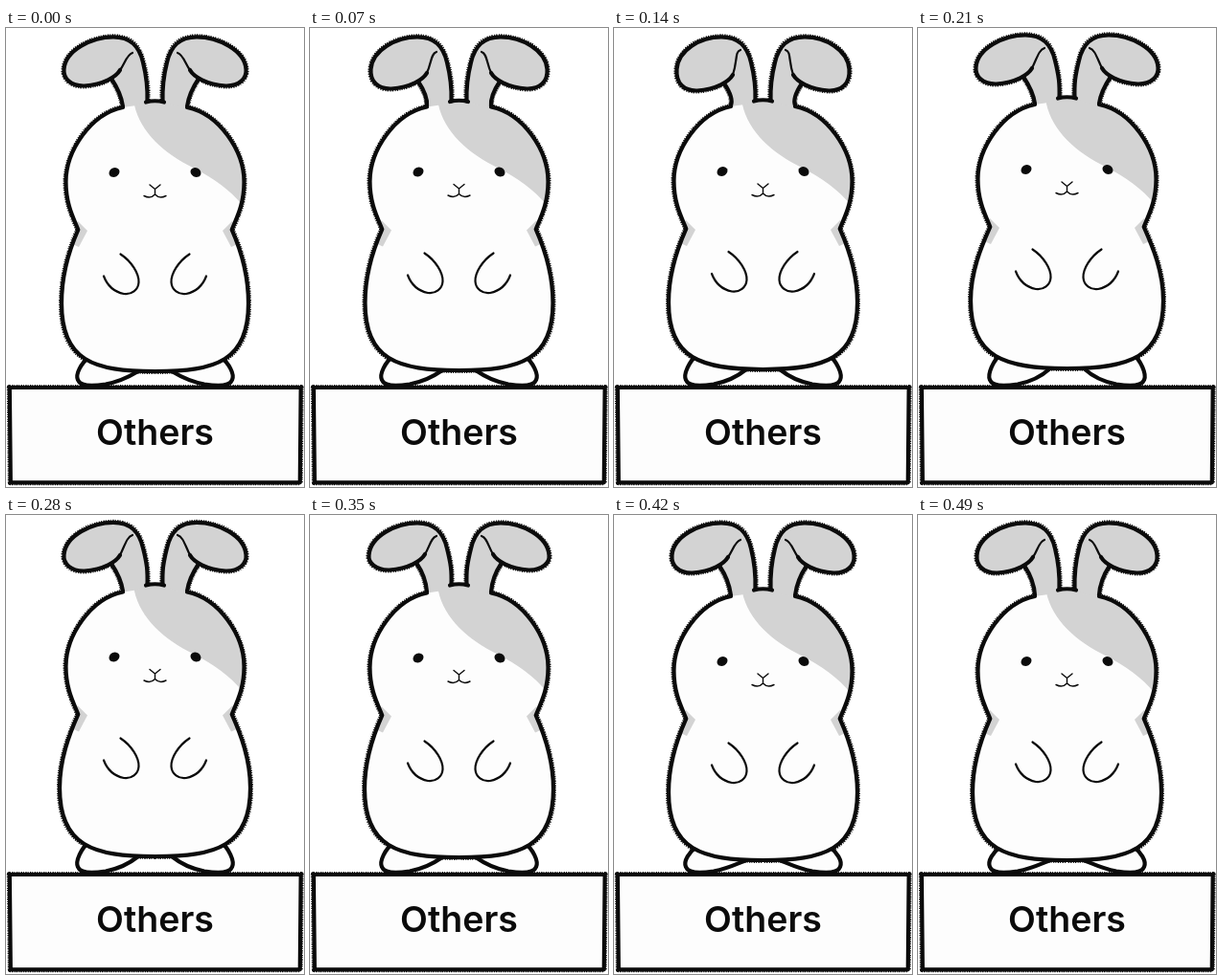
These frames come from a looping animation (311 px wide and 480 px high, 0.56 s). An HTML page:

```html
<!DOCTYPE html>
<html lang="en">
<head>
<meta charset="utf-8">
<title>Rabbit on a sign</title>
<style>
  html, body { margin: 0; width: 100%; height: 100%; overflow: hidden; background: #fff; }
  svg { display: block; width: 100%; height: 100%; }
  path { fill: none; stroke: #0b0b0b; stroke-width: 4.2; stroke-linecap: round; stroke-linejoin: round; }
  .thin { stroke-width: 2.2; }
  .fine { stroke-width: 1.4; }
  .paper { fill: #fdfdfd; }
  .grey { fill: #d3d3d3; }
  .flat { stroke: none; }
  .fringe { stroke-width: 6; stroke-linecap: butt; stroke-dasharray: 1 1.4 1.3 1; }
  text { font: 600 37.5px Inter, sans-serif; fill: #0b0b0b; text-anchor: middle; }
</style>
</head>
<body>
<svg viewBox="0 0 311 480">
  <defs><clipPath id="inside"></clipPath></defs>
  <g id="rabbit"></g>
  <path class="fringe" d="M3.8 376 L307.7 376 L306.8 475.3 L4.8 475.3 Z"/>
  <path class="paper" d="M3.8 376 L307.7 376 L306.8 475.3 L4.8 475.3 Z"/>
  <text x="155.5" y="436">Others</text>
</svg>
<script>
const STEP = 70;
// top, bottom, body left, eye y, paw bottom, ear tip x, ear bottom, ear top, fold y
const poses = [
  [77, 359, 58, 151, 278, 60, 61, 9, 26],
  [76.5, 358, 57.5, 150.5, 277, 63, 64, 9, 25],
  [76, 357, 57, 150, 275.5, 65, 66, 9, 23],
  [73, 356, 55, 148, 273, 60, 59, 7, 21],
  [73, 357, 56, 148.5, 275, 60, 59, 7.5, 21],
  [73, 358, 57, 149.5, 278, 61, 58, 8, 22],
  [78, 361, 57, 153, 280, 60, 61, 8, 26],
  [78, 361, 57, 153, 279, 61, 61, 8, 26]
];

const byId = id => document.getElementById(id);
const path = (d, cls = '') => `<path class="${cls}" d="${d}"/>`;
const FLIP = 'transform="matrix(-1 0 0 1 311 0)"';
const mirror = s => `<g>${s}</g><g ${FLIP}>${s}</g>`;

function drawPose(i) {
  const [top, bottom, side, eye, paw, tip, earLow, earTop, fold] = poses[i];
  const neck = eye + 60;
  const head = eye - 74;
  const spot = eye * 0.4 + 17;

  const half = `M122 ${head + 6} C88 ${head + 13} 62.5 ${head + 52} 62.5 ${head + 84}
    C62.5 ${head + 107} 70 ${neck - 13} 75.3 ${neck}
    C66 ${neck + 21} ${side} ${neck + 47} ${side} ${neck + 77}
    C${side} ${bottom - 11} 91 ${bottom} 155.5 ${bottom}`;
  const fillHalf = `${half} L156 ${bottom} L156 ${top} Q140 ${top} 122 ${head + 6} Z`;

  const foot = `M86 ${bottom - 14} C79 ${bottom - 9} 72 362 75 368
    C78 376 94 374 104 372.5 C118 370 128 365 138 ${bottom}`;

  const crease = `M132 ${fold} C126 ${fold + 2} ${tip + 64} ${fold + 11} ${tip + 59} ${earLow - 17}`;
  const flap = `C${tip + 55} ${earLow - 10} ${tip + 42} ${earLow - 2} ${tip + 22} ${earLow - 0.5}
    C${tip + 8} ${earLow} ${tip - 0.5} ${earLow - 8} ${tip + 0.5} ${earTop + 34}
    C${tip + 2} ${earTop + 14} 90 ${earTop + 0.3} 112 ${earTop + 0.3}
    C130 ${earTop + 0.3} 139 ${earTop + 10} 143 ${earTop + 27}
    C147 ${earTop + 43} 148 ${top - 15} 147.5 ${top}`;
  const joint = `${tip + 50} ${earLow - 8}`;
  const stem = `M${joint} Q${tip + 60} ${earLow + 7} 122 ${head + 5}`;
  const rim = `M${tip + 59} ${earLow - 17} ${flap}`;
  const earFill = `${crease} ${flap} L136 ${head + 4} L122 ${head + 6} L${joint} Z`;

  const cheek = `M75 ${neck - 9} L85 ${neck + 1} L76 ${neck + 18} L58 ${neck + 10} Z`;
  const patch = `M134 ${spot - 10} L134 ${spot + 3}
    C140 ${spot + 31} 165 ${spot + 54} 196 ${spot + 69}
    C216 ${spot + 79} 235 ${spot + 93} 246 ${spot + 107} L262 ${spot + 100} L262 ${spot - 10} Z`;

  const arm = `M119.5 ${paw - 41.5} C131 ${paw - 34} 139 ${paw - 21} 138.5 ${paw - 12}
    C138 ${paw - 4} 131 ${paw + 1} 123 ${paw} C113 ${paw - 2} 106 ${paw - 8} 102 ${paw - 18.5}`;
  const eyeDot = `<ellipse cx="113" cy="${eye}" rx="5.7" ry="4.7" fill="#0b0b0b" transform="rotate(-28 113 ${eye})"/>`;
  const mouth = `M150 ${eye + 13} L155.5 ${eye + 17.5} L161 ${eye + 13}
    M155.5 ${eye + 17.5} V${eye + 23}
    M144 ${eye + 24.5} Q151 ${eye + 28} 155.5 ${eye + 23} Q160 ${eye + 28} 167 ${eye + 24.5}`;

  byId('inside').innerHTML = path(fillHalf) + `<path d="${fillHalf}" ${FLIP}/>`;
  byId('rabbit').innerHTML =
    mirror(path(half, 'fringe') + path(rim, 'fringe') + path(stem, 'fringe')) +
    mirror(path(foot, 'paper')) +
    mirror(path(fillHalf, 'paper flat')) +
    `<g clip-path="url(#inside)">${path(patch, 'grey flat')}${mirror(path(cheek, 'grey flat'))}</g>` +
    mirror(path(earFill, 'grey flat') + path(crease, 'thin') + path(rim) + path(stem) +
      path(half) + path(arm, 'thin') + eyeDot) +
    path(`M146 ${top + 0.5} Q155.5 ${top - 2} 165 ${top + 0.5}`) +
    path(mouth, 'fine');
}

let shown = -1;
function tick() {
  const i = Math.floor(performance.now() / STEP) % poses.length;
  if (i !== shown) drawPose(shown = i);
  requestAnimationFrame(tick);
}
tick();
</script>
</body>
</html>
```
